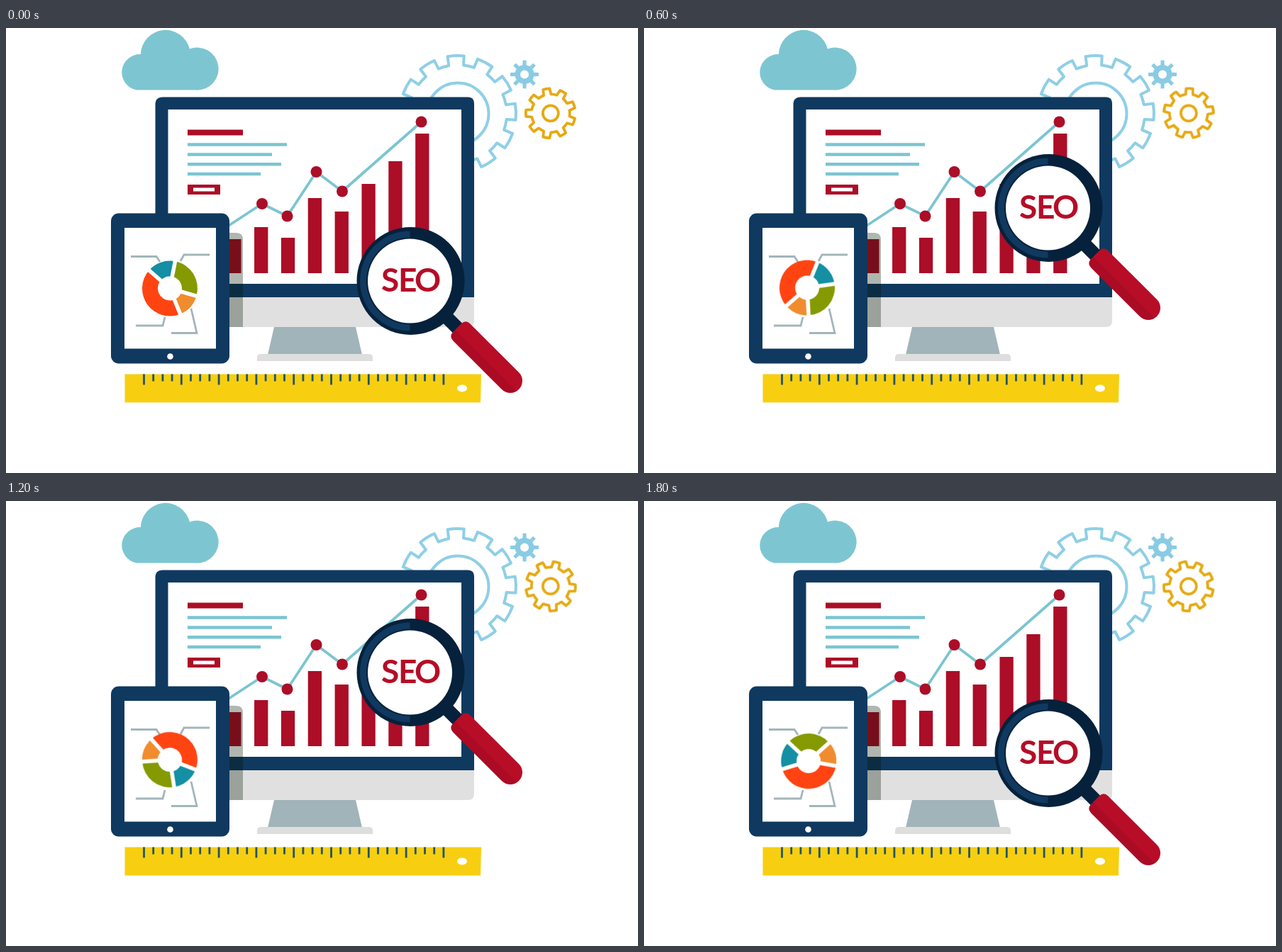
An HTML page that plays this animation: 891x628 px, repeating every 2000 ms.

```html
<!DOCTYPE html>
<html lang="en">
<head>
<meta charset="utf-8">
<title>Search dashboard</title>
<style>
  html, body { margin: 0; width: 100%; height: 100%; overflow: hidden; background: #fff; }
  svg { display: block; width: 891px; height: 628px; }
  .outline { fill: none; stroke-linejoin: round; stroke-linecap: round; }
  .word { font: 700 46px Lato, sans-serif; fill: #b50d27; }
  #lens { animation: lift 2s step-end infinite; }
  #pie { transform-origin: 231.2px 366.3px; animation: turn 2s step-end infinite; }
  #cog { transform-origin: 767.8px 120.3px; animation: spin 2s steps(10) infinite; }
  @keyframes lift {
    0% { transform: translateY(0); }
    10% { transform: translateY(-23px); }
    20% { transform: translateY(-57px); }
    30% { transform: translateY(-103px); }
    40% { transform: translateY(-170px); }
    50% { transform: translateY(-150px); }
    60% { transform: translateY(-115px); }
    70% { transform: translateY(-80px); }
    80% { transform: translateY(-34px); }
    90%, 100% { transform: translateY(-1px); }
  }
  @keyframes turn {
    0% { transform: rotate(0deg); }
    10% { transform: rotate(24deg); }
    20% { transform: rotate(48deg); }
    30% { transform: rotate(71deg); }
    40% { transform: rotate(102deg); }
    50% { transform: rotate(131deg); }
    60% { transform: rotate(160deg); }
    70% { transform: rotate(197deg); }
    80% { transform: rotate(250deg); }
    90%, 100% { transform: rotate(302deg); }
  }
  @keyframes spin { to { transform: rotate(-360deg); } }
</style>
</head>
<body>
<svg viewBox="0 0 891 628">
  <defs>
    <linearGradient id="grip" x1="0" y1="0" x2="0" y2="1">
      <stop offset=".62" stop-color="#b80d27"/>
      <stop offset=".62" stop-color="#ab0b24"/>
    </linearGradient>
  </defs>

  <path fill="#7dc6d1" transform="translate(-.6 -.4)" d="M184.500 88A25.500 25.500 0 0 1 190.500 37.500A35 35 0 0 1 259.500 30A30 30 0 1 1 269 88Z"/>

  <g class="outline" stroke="#8fcfe6" stroke-width="4">
    <path id="bigGear"/>
    <circle cx="637" cy="121" r="43.500"/>
  </g>
  <path id="smallGear" fill="#8acbe4" fill-rule="evenodd"/>
  <g id="cog" class="outline" stroke="#e6a911" stroke-width="3.800">
    <path id="goldGear"/>
    <circle cx="767.800" cy="120.300" r="11"/>
  </g>

  <g id="monitor">
    <path fill="#a1b4b9" d="M378 422H493L502 461H369Z"/>
    <path fill="#dedede" d="M354 470V465Q354 460 360 460H511Q517 460 517 465V470Z"/>
    <path fill="#e0e0e0" d="M211 379H660V413Q660 422 651 422H220Q211 422 211 413Z"/>
    <path fill="#10395f" d="M210.500 380V108Q210.500 97.500 221 97.500H651Q660 97.500 660 107V380Z"/>
    <path fill="#fff" d="M228.500 115H642V361H228.500Z"/>
    <path fill="#ac0d27" d="M256 143.500H334V151.500H256ZM256 221H302V235H256Z"/>
    <path fill="#fff" d="M264 225.500H294V230.500H264Z"/>
    <path stroke="#7bc5d1" stroke-width="4.400" d="M256 164.500H396M256 178.500H375M256 192.300H388M256 206H359"/>
    <g id="bars" fill="#ac0d27"></g>
    <path id="trend" class="outline" stroke="#7bc5d1" stroke-width="3.800"/>
    <g id="dots" fill="#ac0d27"></g>
  </g>

  <path fill="rgba(0,20,0,.31)" d="M300 289H325Q334 289 334 299V422H300Z"/>

  <rect x="148" y="261.500" width="167" height="212" rx="11" fill="#10395f"/>
  <path fill="#fff" d="M167 282H296V452.500H167Z"/>
  <circle cx="231.500" cy="463.500" r="4.300" fill="#fff"/>
  <path fill="none" stroke="#a3b5ba" stroke-width="2.800"
    d="M176 322.500H212L217 330M287 320H251L246 329M183 420H221L224 408M233 430.500H269L261 396"/>
  <g id="pie"></g>

  <path fill="#f7cf10" d="M167.500 488.500H670L669 528.500H167.500Z"/>
  <path id="ticks" stroke="#1f546b" stroke-width="2.800"/>
  <ellipse cx="643" cy="508.500" rx="7" ry="5" fill="#fff"/>

  <g id="lens">
    <path stroke="#06213b" stroke-width="19" d="M615 402L643 430"/>
    <path fill="url(#grip)" transform="translate(641 428) rotate(45)"
      d="M2 -17H99A17 17 0 0 1 99 17H2Q-7 17 -7 8V-8Q-7 -17 2 -17Z"/>
    <circle cx="570.500" cy="357" r="76" fill="#06213b"/>
    <path fill="#10395f" d="M569.500 286.500A70.500 70.500 0 0 0 569.500 427.500Z"/>
    <circle cx="569.500" cy="357" r="61.500" fill="#06213b"/>
    <circle cx="569.500" cy="357" r="59.500" fill="#fff"/>
    <text class="word" x="529 553 576" y="372">SEO</text>
  </g>
</svg>
<script>
  const $ = id => document.getElementById(id);
  const polar = (cx, cy, r, deg) => {
    const a = deg * Math.PI / 180;
    return [cx + r * Math.cos(a), cy + r * Math.sin(a)].map(v => v.toFixed(2)).join(' ');
  };

  // Each tooth: root, tip, tip, root, as fractions of the pitch.
  function gear(cx, cy, teeth, root, tip, wide, narrow, start) {
    const step = 360 / teeth;
    let d = '';
    for (let i = 0; i < teeth; i++) {
      const mid = start + i * step;
      const at = (r, k) => polar(cx, cy, r, mid + k * step);
      d += `${i ? `A${root} ${root} 0 0 1 ` : 'M'}${at(root, -wide)}`
        + `L${at(tip, -narrow)}A${tip} ${tip} 0 0 1 ${at(tip, narrow)}L${at(root, wide)}`;
    }
    return `${d}A${root} ${root} 0 0 1 ${polar(cx, cy, root, start - wide * step)}Z`;
  }

  $('bigGear').setAttribute('d', gear(637, 121, 12, 69, 82, .29, .27, -92));
  $('goldGear').setAttribute('d', gear(767.8, 120.3, 9, 27, 35, .28, .19, 180));
  $('smallGear').setAttribute('d', gear(731, 65.500, 8, 13.5, 20, .25, .16, -90)
    + 'M725 65.500a6 6 0 1 0 12 0a6 6 0 1 0 -12 0Z');

  const tops = [298, 281, 296, 240, 259, 220, 188, 149];
  $('bars').innerHTML = tops.map((y, i) =>
    `<rect x="${312.2 + i * 37.85}" y="${y}" width="19.300" height="${346 - y}"/>`).join('');

  const points = [[361, 248], [396.5, 265.5], [437.5, 203], [474, 230.5], [585.5, 132.5]];
  $('trend').setAttribute('d', 'M300 288L' + points.join('L'));
  $('dots').innerHTML = points.map(([x, y]) => `<circle cx="${x}" cy="${y}" r="8"/>`).join('');

  let ticks = '';
  for (let i = 0; i <= 32; i++) ticks += `M${194.500 + i * 13.200} 488.500V${i % 4 ? 498.5 : 503.5}`;
  $('ticks').setAttribute('d', ticks);

  const cx = 231, cy = 367.5;
  const slices = [[16, 68, '#f08c2e'], [68, 221, '#ff4412'], [221, 281, '#148fa3'], [281, 376, '#859a00']];
  $('pie').innerHTML = slices.map(([a, b, color]) =>
      `<path fill="${color}" d="M${polar(cx, cy, 39, a)}A39 39 0 0 1 ${polar(cx, cy, 39, b)}`
      + `L${polar(cx, cy, 17, b)}A17 17 0 0 0 ${polar(cx, cy, 17, a)}Z"/>`).join('')
    + slices.map(([a]) =>
      `<path stroke="#fff" stroke-width="5.500" d="M${cx} ${cy}L${polar(cx, cy, 40.500, a)}"/>`).join('');
</script>
</body>
</html>
```
